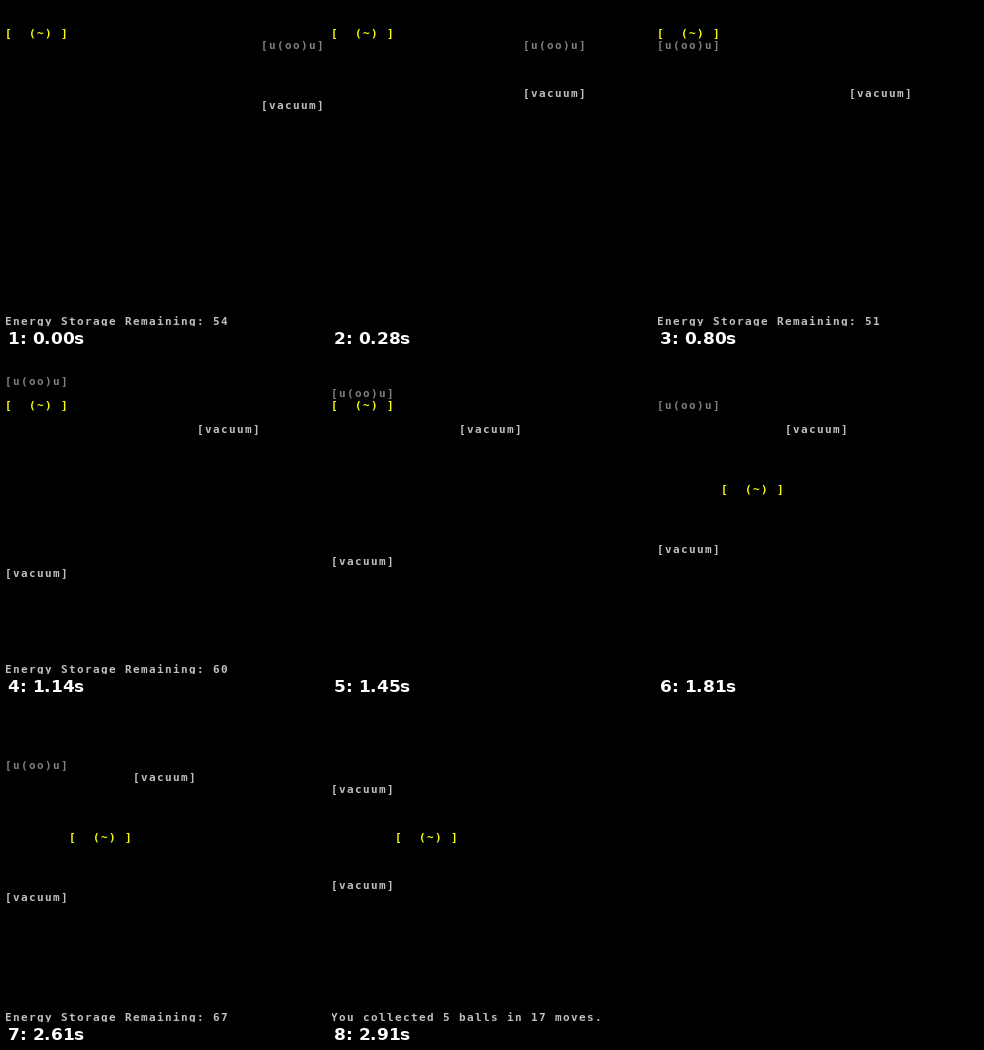
Animation, 320 px wide and 320 px high, one loop 5.81 s. Source, as an HTML page:

```html
<!DOCTYPE html>
<html lang="en">
<head>
<meta charset="utf-8">
<title>Vacuum game</title>
<style>
  html, body { margin: 0; width: 100%; height: 100%; overflow: hidden; background: #000; }
  #stage { position: relative; width: 320px; height: 320px; overflow: hidden; }
  #stage div {
    position: absolute; left: -1px; top: 21px; white-space: pre;
    font: bold 11px/13px "DejaVu Sans Mono", "Liberation Mono", monospace;
    letter-spacing: calc(8px - 1ch); color: #c0c0c0;
  }
  #stage #ball { color: #ff0; }
  #stage #bot { color: #808080; }
  #stage #status { top: 309px; }
</style>
</head>
<body>
<div id="stage">
  <div id="ball">[  (~) ]</div>
  <div id="bot">[u(oo)u]</div>
  <div id="hunter">[vacuum]</div>
  <div id="drifter">[vacuum]</div>
  <div id="status"></div>
</div>
<script>
  const LOOP = 5810, REDRAW = 50, CELL_W = 64, CELL_H = 12;
  const $ = id => document.getElementById(id);

  // One letter per turn; Q and Z are the upper and lower left diagonals.
  const turns = [280, 460, 620, 800, 1080, 1450, 1810, 2610, 2730, 2910];
  const paths = { bot: "LLLLUDDDDD", hunter: "Q...UL..LZ", drifter: ".....UU.U." };
  const steps = { L: [-1, 0], U: [0, -1], D: [0, 1], Q: [-1, -1], Z: [-1, 1], ".": [0, 0] };
  const spots = [[0, 0], [0, 2], [1, 9]];

  const meet = (a, b) => a[0] === b[0] && a[1] === b[1];

  // Replays the game up to time t.
  function play(t) {
    const pos = { bot: [4, 1], hunter: [4, 6], drifter: [0, 16] };
    const count = turns.filter(at => at <= t).length;
    let caught = 0;
    for (let i = 0; i < count; i++) {
      for (const id in paths) {
        const [dx, dy] = steps[paths[id][i]];
        pos[id][0] += dx;
        pos[id][1] += dy;
      }
      if (meet(pos.bot, spots[caught])) caught++;
    }
    pos.ball = spots[caught];
    return { pos, count, caught, over: meet(pos.bot, pos.hunter) };
  }

  function statusText({ count, caught, over }, t) {
    if (over) return "You collected 5 balls in 17 moves.";
    // The status line is briefly blank after a vacuum moves.
    const last = count - 1;
    const moved = [paths.hunter, paths.drifter].some(path => last >= 0 && path[last] !== ".");
    if (moved && t - turns[last] < REDRAW) return "";
    return `Energy Storage Remaining: ${54 - Math.max(0, last) + 10 * caught}`;
  }

  function draw(t) {
    const game = play(t);
    for (const [id, [col, row]] of Object.entries(game.pos)) {
      $(id).style.transform = `translate(${col * CELL_W}px, ${row * CELL_H}px)`;
    }
    $("bot").hidden = game.over;
    $("drifter").hidden = game.caught === 0;
    $("status").textContent = statusText(game, t);
  }

  const start = performance.now();
  function tick() {
    draw((performance.now() - start) % LOOP);
    requestAnimationFrame(tick);
  }
  tick();
</script>
</body>
</html>
```
